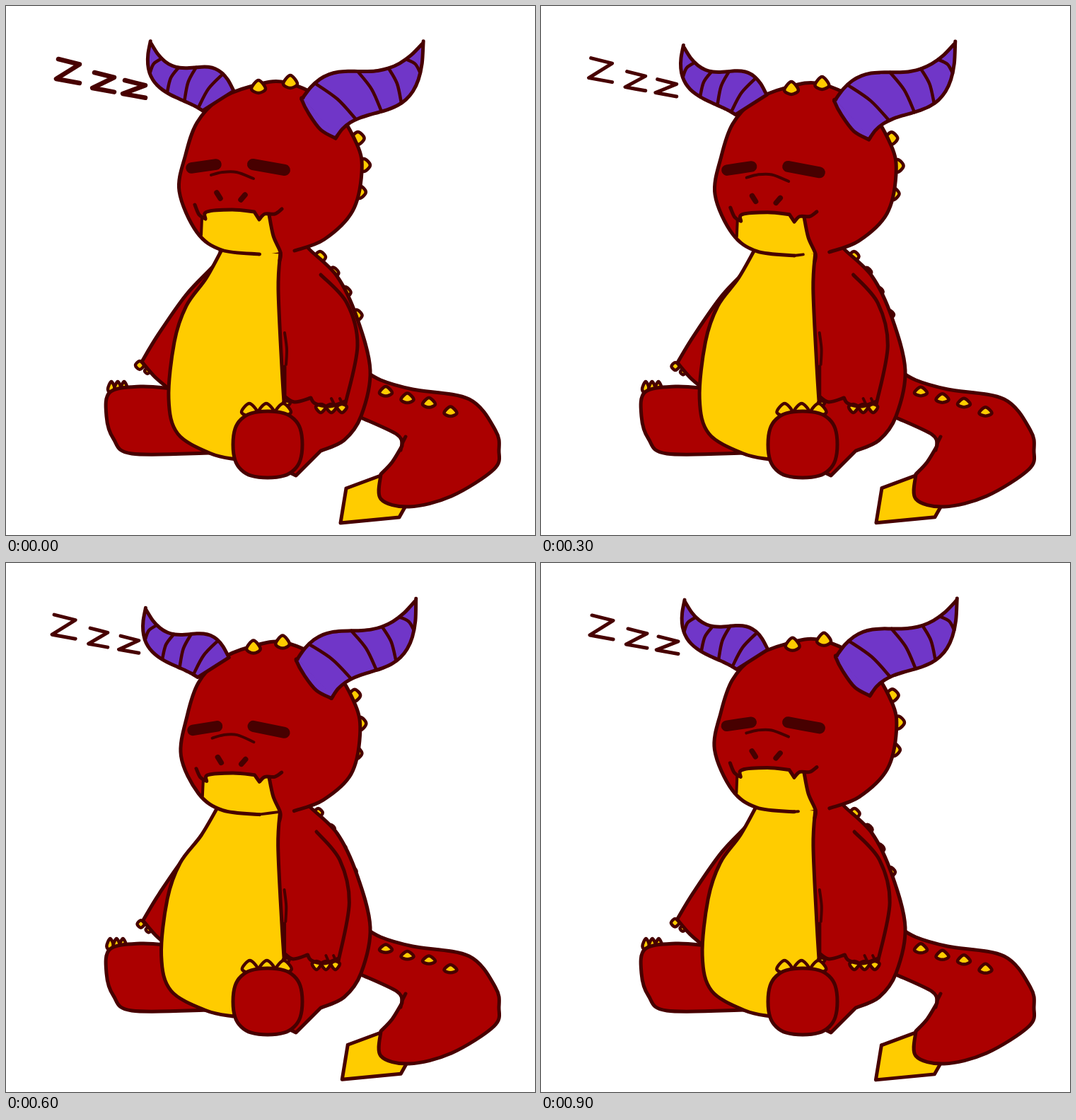
Write an HTML page with a canvas that moves like this. It is 748 by 748 pixels and loops after 1.05 s.

```html
<!DOCTYPE html>
<html lang="en">
<head>
<meta charset="utf-8">
<title>Sleeping dragon</title>
<style>
  html, body { margin: 0; width: 100%; height: 100%; overflow: hidden; background: #fff; }
  canvas { display: block; }
</style>
</head>
<body>
<canvas id="stage" width="748" height="748"></canvas>
<script>
const ctx = document.getElementById('stage').getContext('2d');
const INK = '#470000', RED = '#ab0000', GOLD = '#ffcc00', PURPLE = '#7036c8';
const STEP = 150, STEPS = 7, EXHALED = 5;

// How far each part has sunk: 0 is inhaled, 1 exhaled.
let head = 0, body = 0, belly = 0;

function breathe(step) {
  const u = (step > EXHALED ? 1 : step) / EXHALED;
  const v = Math.min(1, u * 1.35);
  head = u ** 1.25;
  body = u ** 0.8;
  belly = v * v * (3 - 2 * v);
}

// Every point passes through the warp of the part being drawn.
const still = (x, y) => [x, y];
const shift = (dx, dy) => (x, y) => [x + dx, y + dy];
const widen = (axis, factor) => (x, y) => [axis + (x - axis) * factor, y];
let warp = still;

// The head settles and narrows, while the face slumps a little further.
const headWarp = (x, y) => {
  const slump = Math.exp(-(((y - 265) / 42) ** 2));
  return [x + (374 - x) * 0.025 * head, y + (6 + 8 * slump) * head];
};

function tilt(cx, cy, dx, dy, angle) {
  const c = Math.cos(angle), s = Math.sin(angle);
  return (x, y) => [
    cx + dx + (x - cx) * c - (y - cy) * s,
    cy + dy + (x - cx) * s + (y - cy) * c];
}

// Smooth curve through points; "/" marks a corner, a trailing "z" closes smoothly.
function curve(text) {
  const path = new Path2D();
  const closed = text.endsWith('z');
  let last = null;
  for (const part of text.replace('z', '').split('/')) {
    const pts = part.trim().split(/\s+/).map(p => warp(...p.split(',').map(Number)));
    if (last) pts.unshift(last);
    else path.moveTo(...pts[0]);
    const n = pts.length;
    const at = i => closed ? pts[(i + n) % n] : pts[Math.max(0, Math.min(n - 1, i))];
    for (let i = 0; i < (closed ? n : n - 1); i++) {
      const [a, b, c, d] = [at(i - 1), at(i), at(i + 1), at(i + 2)];
      path.bezierCurveTo(
        b[0] + (c[0] - a[0]) / 6, b[1] + (c[1] - a[1]) / 6,
        c[0] - (d[0] - b[0]) / 6, c[1] - (d[1] - b[1]) / 6, c[0], c[1]);
    }
    last = pts[n - 1];
  }
  return path;
}

function shape(fill, points, width = 5) {
  const path = curve(points);
  if (fill) { ctx.fillStyle = fill; ctx.fill(path); }
  if (width) { ctx.lineWidth = width; ctx.stroke(path); }
}

const line = (points, width) => shape(null, points, width);

const claw = (x, y, w, h) =>
  shape(GOLD, `${x - w},${y} ${x},${y - h} ${x + w},${y} ${x},${y + h / 2} z`, 4.5);

const knob = (x, y, r) =>
  shape(GOLD, `${x - r},${y} ${x},${y - r} ${x + r},${y} ${x},${y + r} z`, 4.5);

function repeat(count, draw) {
  for (let i = 0; i < count; i++) draw(i);
}

function drawTail() {
  warp = shift(3 * head, -head);
  shape(GOLD, '481,682 / 535,662 / 565,707 / 556,723 / 473,731 / 481,682');
  warp = still;
  shape(RED, '500,511 530,529 575,542 655,556 692,600 697,628 690,655 630,693 570,708 530,697 530,662 / ' +
             '546,645 560,622 / 553,606 502,582');
  line('558,628 561,617 565,609');
  repeat(4, i => claw(537 + 30.5 * i, 547 + 9.5 * i - (i === 2 ? 3 : 0), 9, 9 - 2 * head));
}

function drawFarSide() {
  warp = still;
  repeat(4, i => knob(444 + 19 * i - 0.6 * i * i - (3 + i) * body,
                      355 + 20 * i + 2.5 * i * i - 2 * body, 8 - (2 + i / 2) * body));

  warp = shift(2 * body, 3 * body);
  knob(189, 508, 6 - body);
  knob(200, 516, 4);
  shape(RED, '303,343 298,362 255,408 215,465 192,503 / 210,524 230,541 / 290,500');

  warp = shift(-2 * body, 0);
  repeat(3, i => claw(149 + 9 * i, 542, 5, 11));
  warp = still;
  shape(RED, '235,541 190,538 147,546 142,580 152,612 178,633 288,632');
}

function drawTrunk() {
  warp = still;
  shape(RED, '360,335 / 428,335 / 428,343 468,382 496,440 515,515 502,580 478,614 445,629 / 410,664 / 360,640');

  warp = widen(390, 1 + 0.065 * belly);
  shape(GOLD, '306,343 283,385 255,424 238,475 230,555 243,605 290,633 325,641 / 394,575 / ' +
              '390,510 385,400 388,348 / 306,343');
}

function drawNearSide() {
  warp = widen(390, 1 - 0.13 * body);
  line('445,380 482,420 497,480 480,562');
  line('394,462 397,485 396,507', 4);
  claw(397, 561, 5, -5);
  repeat(3, i => claw(445 + 15 * i, 567, 7, -8));
  line('394,510 394,552 / 408,560 431,554 / 437,562 458,566 480,559');
  repeat(2, i => line(`${460 + 12 * i},555 ${464 + 12 * i},563`, 4));

  warp = still;
  repeat(3, i => claw(344 + 24 * i + body, 574, 11, 12));
  const corner = v => Math.sign(v) * Math.abs(v) ** 0.78;
  let foot = '';
  repeat(16, i => {
    const a = i * Math.PI / 8;
    foot += `${370 + 49 * corner(Math.cos(a))},${620 + 47 * corner(Math.sin(a))} `;
  });
  shape(RED, foot + 'z');
}

function drawHead() {
  warp = headWarp;
  repeat(3, i => {
    const y = 187 + 38 * i;
    knob(506 - (y - 228) ** 2 / 200 - 3 * head, y - 6 * head, 9 - head);
  });

  const outline = '358,351 305,345 270,320 245,262 254,210 270,165 300,133 345,114 395,108 ' +
                  '460,140 496,195 503,235 490,290 450,330 408,346';
  shape(RED, outline, 0);
  shape(GOLD, '277,300 / 284,291 320,288 351,291 / 357,302 / 366,294 / 372,295 / ' +
              '378,325 387,348 / 358,351 305,345 276,324 / 277,300', 0);
  line(outline);
  line(`357,351 ${359 + 37 * head},${351 - 5 * head}`, 4);
  line('372,295 378,325 388,348 387,360');
  line('276,324 277,300', 4);
  line('267,281 273,295 282,301 / 284,291 320,288 351,291 / 358,302 / 366,294 380,294 390,287');

  // Shut eyes, brow and nostrils
  line('262,229 297,224', 15.5);
  line('349,224 394,232', 16);
  line('290,239 306,235 326,235 350,244', 4);
  line('298,264 303,272', 7.5);
  line('338,267 332,274', 7.5);

  repeat(2, i => claw(357 + 45 * i - (10 + 4 * i) * head, 117 - 7 * i, 10, 12));
}

function bezier([a, b, c, d], t) {
  const s = 1 - t;
  return [0, 1].map(k =>
    a[k] * s ** 3 + 3 * b[k] * s * s * t + 3 * c[k] * s * t * t + d[k] * t ** 3);
}

// A horn lies between two edges from base to tip; each stripe joins a point on both.
function horn(upper, lower, stripes) {
  const edge = side => Array.from({ length: 13 }, (_, i) => bezier(side, i / 12));
  const text = points => points.join(' ');
  shape(PURPLE, `${text(edge(upper))} / ${text(edge(lower).reverse())} / ${upper[0]}`);
  for (const [t, u] of stripes) {
    const [x, y] = bezier(upper, t), [p, q] = bezier(lower, u);
    const bow = Math.sign(p - x) * 3;
    line(`${x},${y} ${(x + p) / 2 + bow},${(y + q) / 2 - 3} ${p},${q}`, 4.5);
  }
}

function drawHorns() {
  warp = shift(-9 * head, 18 * head);
  horn([[322, 120], [290, 45], [245, 130], [204, 51]],
       [[278, 148], [245, 125], [185, 125], [204, 51]],
       [[.15, .06], [.48, .23], [.68, .44], [.87, .74]]);

  warp = tilt(418, 132, -10 * head, 8 * head, -0.044 * head);
  horn([[418, 132], [470, 50], [520, 135], [590, 52]],
       [[466, 187], [500, 125], [590, 185], [590, 52]],
       [[.12, .22], [.5, .44], [.75, .62], [.88, .87]]);
  shape(PURPLE, '420,130 / 418,132 428,152 445,175 466,187 / 468,184', 5);
}

function drawSnore() {
  warp = shift(-7 * body, -2 * Math.sqrt(body));
  const weight = 6.5 - 1.5 * Math.min(1, body * 4);
  const letter = (x, y, w, h) =>
    line(`${x},${y} / ${x + w},${y + w / 4} / ${x - w / 10},${y + h} / ${x + w},${y + h + w / 5}`, weight);
  letter(74, 75, 30, 28);
  letter(125, 94, 28 - 4 * body, 22);
  letter(168, 105, 29 - 4 * body, 19);
}

function frame(time) {
  breathe(Math.floor(time / STEP) % STEPS);
  ctx.fillStyle = '#fff';
  ctx.fillRect(0, 0, 748, 748);
  ctx.strokeStyle = INK;
  ctx.lineCap = ctx.lineJoin = 'round';
  drawTail();
  drawFarSide();
  drawTrunk();
  drawNearSide();
  drawHead();
  drawHorns();
  drawSnore();
}

const start = performance.now();
function tick() {
  frame(performance.now() - start);
  requestAnimationFrame(tick);
}
tick();
</script>
</body>
</html>
```
